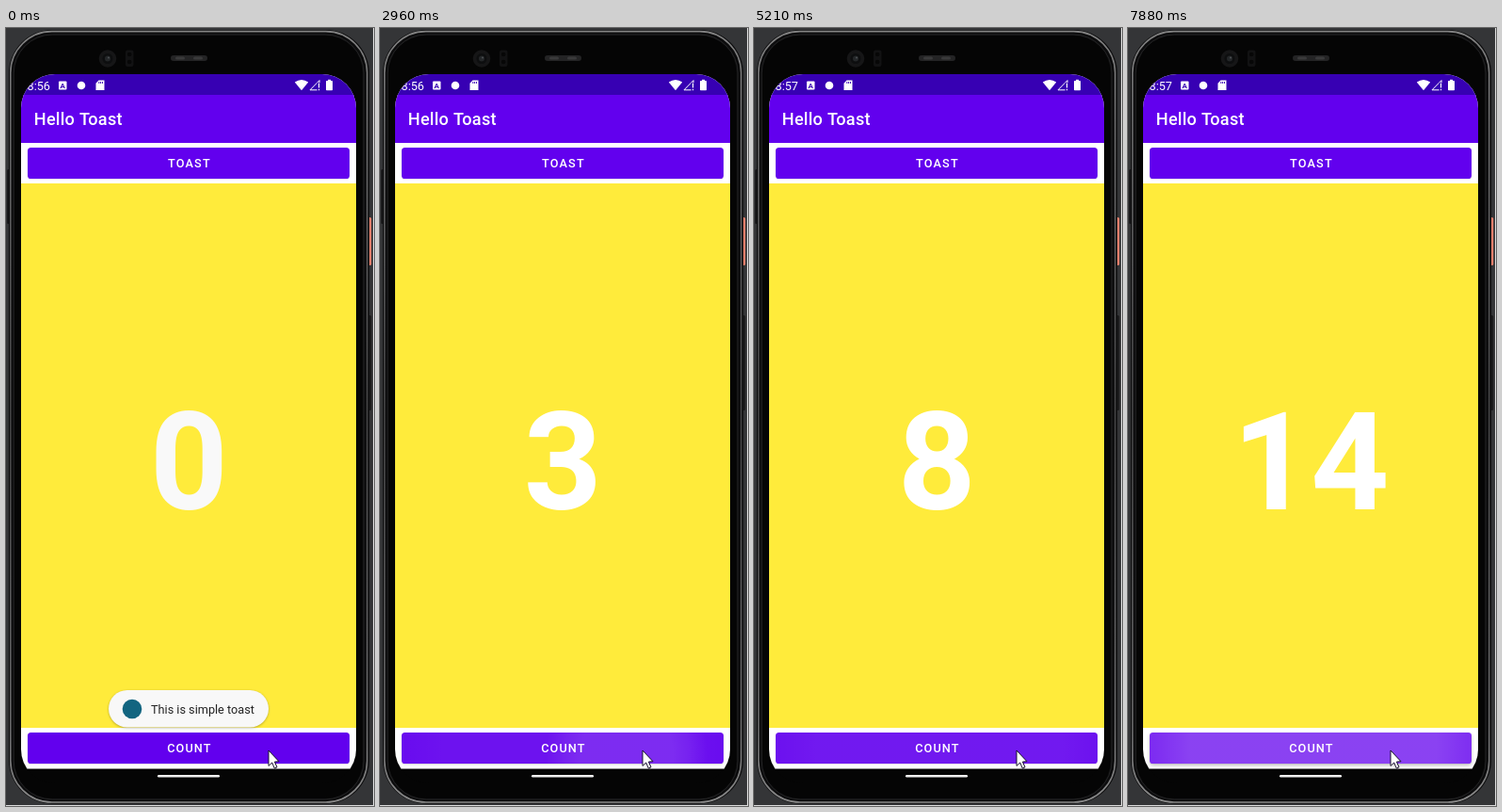
An HTML page with a canvas that plays this animation: 391 by 826 pixels, repeating every 8000 ms.

```html
<!DOCTYPE html>
<html lang="en">
<head>
<meta charset="utf-8">
<title>Hello Toast</title>
<style>
html, body { margin: 0; width: 100%; height: 100%; overflow: hidden; background: #343537; }
canvas { display: block; width: 391px; height: 826px; }
</style>
</head>
<body>
<canvas id="stage"></canvas>
<script>
const W = 391, H = 826, LOOP = 8000;
const DP = 0.9066;
const canvas = document.getElementById('stage');
const ctx = canvas.getContext('2d');
const dpr = window.devicePixelRatio || 1;
canvas.width = W * dpr;
canvas.height = H * dpr;

const PURPLE = '#6200ee', YELLOW = '#ffeb3b';
const FIRST_TAP = 1380, TAP_GAP = 478, RELEASE = 110;
const FADE_START = 750, CLOCK_TICK = 4170;

// The screen refreshes unevenly: [first, last, refreshes]
const refreshes = [
  [0, 0, 1], [870, 1110, 3], [1380, 2180, 6], [2420, 2420, 1],
  [2570, 3520, 8], [3640, 3640, 1], [3910, 4550, 6], [4790, 4910, 2],
  [5060, 5900, 7], [6020, 6020, 1], [6140, 7070, 8], [7220, 7880, 6]
];

function snap(t) {
  const [from, to, n] = refreshes.filter(r => r[0] <= t).pop();
  if (n === 1) return from;
  const gap = (to - from) / (n - 1);
  return from + gap * Math.min(n - 1, Math.floor((t - from) / gap + 1e-6));
}

const clamp = v => Math.max(0, Math.min(1, v));
const mix = (a, b, k) => a + (b - a) * k;

function box(x, y, w, h, r, fill) {
  ctx.beginPath();
  ctx.roundRect(x, y, w, h, r);
  if (fill) { ctx.fillStyle = fill; ctx.fill(); }
}

function outline(x, y, w, h, r, color, width) {
  box(x, y, w, h, r);
  ctx.strokeStyle = color;
  ctx.lineWidth = width;
  ctx.stroke();
}

function disc(x, y, r, fill) {
  ctx.beginPath();
  ctx.arc(x, y, r, 0, Math.PI * 2);
  ctx.fillStyle = fill;
  ctx.fill();
}

function shape(points, fill) {
  ctx.beginPath();
  points.forEach(([x, y]) => ctx.lineTo(x, y));
  ctx.closePath();
  if (fill) { ctx.fillStyle = fill; ctx.fill(); }
}

function label(str, x, y, size, weight, color, align = 'left', spacing = 0) {
  ctx.font = `${weight} ${size}px Roboto, sans-serif`;
  ctx.letterSpacing = spacing + 'px';
  ctx.textAlign = align;
  ctx.fillStyle = color;
  ctx.fillText(str, x, y);
}

function shadow(color, blur, dy) {
  ctx.shadowColor = color;
  ctx.shadowBlur = blur * dpr;
  ctx.shadowOffsetY = dy * dpr;
}

function drawBody() {
  ctx.fillStyle = '#343537';
  ctx.fillRect(0, 0, W, H);
  ctx.fillStyle = '#dcdcdc';
  ctx.fillRect(W - 1, 0, 1, H);
  ctx.fillRect(0, H - 1, W, 1);

  box(385, 201, 3.2, 51, 1.5, '#e5806d');
  box(385, 305, 3.2, 101, 1.5, '#1b1b1c');
  box(1, 150, 3, 58, 1.5, '#18181a');
  box(3, 2, 383, 821.5, 46, '#0c0c0d');

  const rim = ctx.createLinearGradient(0, 0, 0, H);
  rim.addColorStop(0, '#858585');
  rim.addColorStop(0.12, '#6a6a6b');
  rim.addColorStop(0.5, '#424243');
  rim.addColorStop(0.9, '#69696a');
  rim.addColorStop(1, '#8c8c8c');
  outline(4.8, 3.6, 378.9, 818.4, 44, rim, 1.6);
  outline(8.2, 7, 371.8, 812, 41, '#232324', 1);
  box(9, 8, 370, 810, 40, '#050505');

  disc(108, 32.5, 9.3, '#161617');
  disc(108, 32.5, 5.5, '#0d0e0f');
  disc(108, 32.5, 3, '#242729');
  disc(109, 31.5, 1, '#4c5053');
  box(127, 23.5, 8.5, 17.5, 2, '#121213');
  disc(131.2, 28, 2.3, '#070707');
  disc(131.2, 36, 2.3, '#070707');
  box(175, 29, 39, 6, 3, '#242425');
  box(180, 30.5, 10, 3, 1.5, '#3a3a3b');
  box(199, 30.5, 10, 3, 1.5, '#3a3a3b');
}

function drawStatus(t) {
  ctx.fillStyle = '#3700b3';
  ctx.fillRect(16, 49, 356, 22);
  label(t < CLOCK_TICK ? '8:56' : '8:57', 22.5, 65.5, 14 * DP, 400, '#fff');

  box(56, 56.5, 8.5, 9, 1, '#fff');
  label('A', 60.25, 64, 8, 700, '#3700b3', 'center');
  disc(80, 61, 4.3, '#fff');

  shape([[95.5, 58.8], [98.5, 55.5], [104.5, 55.5], [104.5, 66], [95.5, 66]], '#fff');
  ctx.fillStyle = '#3700b3';
  for (let i = 0; i < 3; i++) ctx.fillRect(98.4 + i * 1.8, 57, 0.9, 2);

  ctx.beginPath();
  ctx.moveTo(314, 66.2);
  ctx.lineTo(306.8, 57.6);
  ctx.quadraticCurveTo(314, 52.6, 321.2, 57.6);
  ctx.closePath();
  ctx.fillStyle = '#fff';
  ctx.fill();

  shape([[323, 65.8], [333, 55.6], [333, 65.8]]);
  ctx.strokeStyle = '#fff';
  ctx.lineWidth = 1;
  ctx.stroke();
  ctx.fillStyle = '#3700b3';
  ctx.fillRect(330.6, 58, 4, 9);
  ctx.fillStyle = '#fff';
  ctx.fillRect(331.9, 58.5, 1.2, 5);
  ctx.fillRect(331.9, 64.8, 1.2, 1.4);

  box(340, 56, 7, 10.3, 0.8, '#fff');
  ctx.fillRect(342, 54.8, 3, 1.5);
}

function drawButton(y, lift) {
  ctx.save();
  shadow(`rgba(0,0,0,${0.14 + lift * 0.16})`, 1.5 + lift * 2.5, 0.6 + lift * 1.2);
  box(23, y, 342, 33, 3.6, PURPLE);
  ctx.restore();
}

function caption(text, y) {
  const size = 14 * DP;
  label(text, 194.9, y + 21.2, size, 500, '#fff', 'center', size * 0.0893);
}

function ripple(age) {
  const grow = clamp(age / 210);
  const ease = 1 - (1 - grow) ** 2;
  const alpha = 0.28 * clamp(age / 70) * (1 - clamp((age - 260) / 330));
  if (alpha <= 0) return;
  const x = mix(283, 197, ease), y = mix(774, 764.5, ease);
  const r = mix(40, 230, ease);
  const g = ctx.createRadialGradient(x, y, 0, x, y, r);
  g.addColorStop(0, `rgba(255,255,255,${alpha})`);
  g.addColorStop(0.57, `rgba(255,255,255,${alpha})`);
  g.addColorStop(0.77, `rgba(255,255,255,${alpha * 0.62})`);
  g.addColorStop(1, 'rgba(255,255,255,0)');
  ctx.fillStyle = g;
  ctx.fillRect(23, 748, 342, 33);
}

function drawCountButton(t) {
  const tap = Math.floor((t - FIRST_TAP) / TAP_GAP);
  const age = t - FIRST_TAP - tap * TAP_GAP;
  const lift = tap < 0 ? 0 : clamp(age / 100) * (1 - clamp((age - 260) / 200));
  drawButton(748, lift);
  ctx.save();
  box(23, 748, 342, 33, 3.6);
  ctx.clip();
  for (let i = Math.max(0, tap - 1); i <= tap; i++) ripple(t - FIRST_TAP - i * TAP_GAP);
  ctx.restore();
  caption('COUNT', 748.2);
}

function drawToast(t) {
  const alpha = 1 - clamp((t - FADE_START) / 340);
  if (alpha <= 0) return;
  ctx.save();
  ctx.globalAlpha = alpha;
  ctx.save();
  shadow('rgba(0,0,0,0.3)', 2.5, 0.8);
  box(109, 703, 170, 39.5, 19.75, '#f8f8f8');
  ctx.restore();
  disc(134, 723, 10.3, '#126580');
  label('This is simple toast', 154, 727.8, 14 * DP, 400, '#222');
  ctx.restore();
}

function drawCursor() {
  shape([[279, 767], [279, 783.4], [282.7, 780], [285.3, 786], [288, 784.8],
    [285.4, 779.1], [290, 778.7]], '#fff');
  ctx.strokeStyle = '#16102a';
  ctx.lineWidth = 1;
  ctx.stroke();
}

function drawScreen(t) {
  ctx.save();
  box(16, 49, 356, 753, 36);
  ctx.clip();
  ctx.fillStyle = '#fff';
  ctx.fillRect(16, 49, 356, 738);
  ctx.fillStyle = '#050505';
  ctx.fillRect(16, 786.5, 356, 16);
  ctx.fillStyle = PURPLE;
  ctx.fillRect(16, 71, 356, 51);
  drawStatus(t);
  label('Hello Toast', 29.8, 103.2, 20 * DP, 500, '#fff', 'left', 0.23);

  drawButton(127, 0);
  caption('TOAST', 127);
  ctx.fillStyle = YELLOW;
  ctx.fillRect(16, 165, 356, 578);
  const count = Math.max(0, Math.floor((t - FIRST_TAP - RELEASE) / TAP_GAP) + 1);
  label(String(count), 194.3, 511.2, 160 * DP, 700, count ? '#fff' : '#f9f9f9', 'center');
  drawCountButton(t);
  drawToast(t);
  ctx.restore();
  box(161, 793, 66, 2.4, 1.2, '#f2f2f2');
}

const start = performance.now();

function draw() {
  const t = snap((performance.now() - start) % LOOP);
  ctx.setTransform(dpr, 0, 0, dpr, 0, 0);
  drawBody();
  drawScreen(t);
  drawCursor();
  requestAnimationFrame(draw);
}

draw();
</script>
</body>
</html>
```
